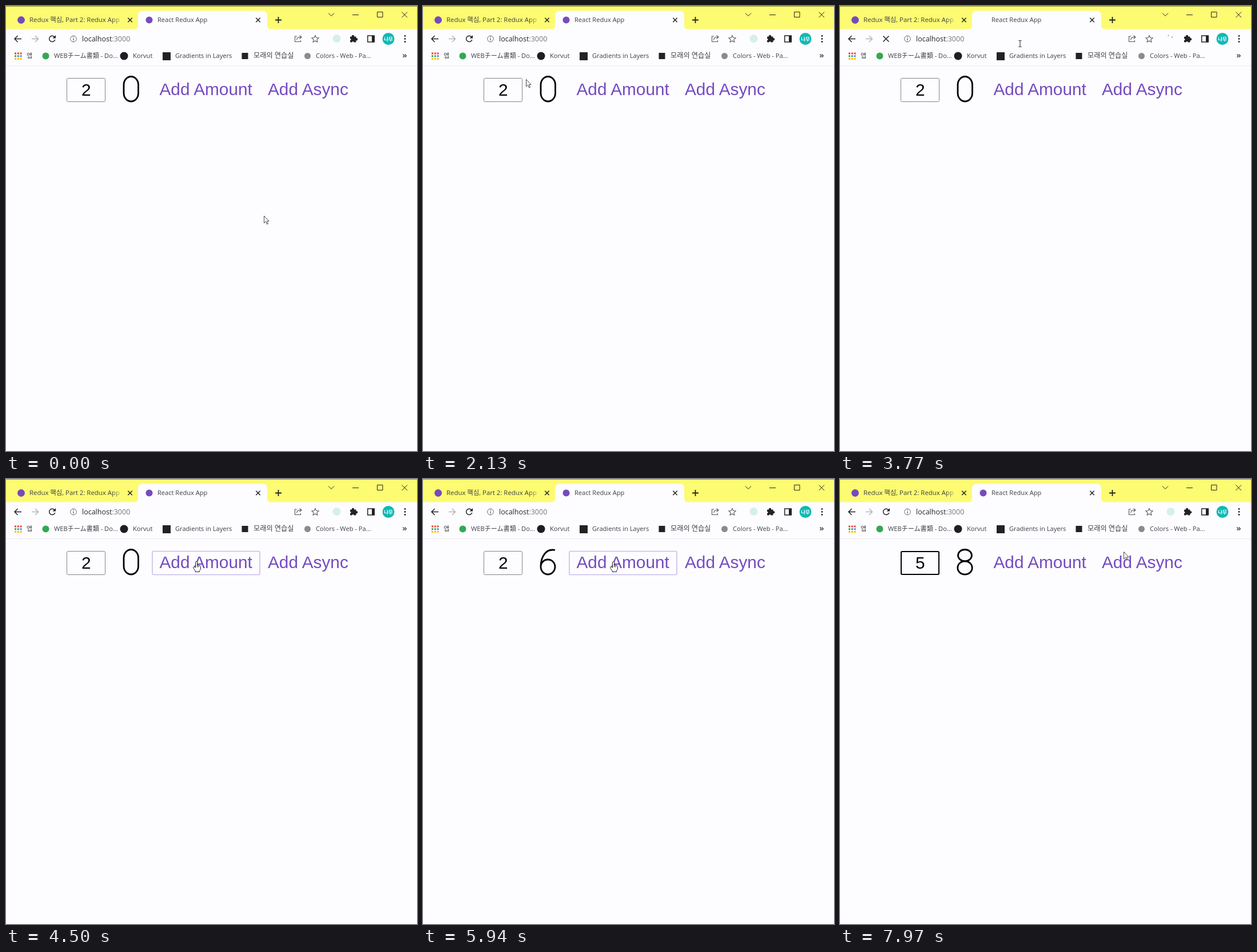
These frames come from a looping animation (719 by 779 pixels, 8 s). An HTML page:

```html
<!DOCTYPE html>
<html lang="ko">
<head>
<meta charset="utf-8">
<title>React Redux App</title>
<style>
html, body { margin: 0; width: 100%; height: 100%; overflow: hidden; background: #fdfcff; }
svg { display: block; width: 100%; height: 100%; }
text { white-space: pre; }
.ui { font: 11.1px "Open Sans", "Noto Sans CJK KR", "Noto Sans CJK JP", "Noto Sans CJK", sans-serif; fill: #3c4043; }
.page { font: 29.8px "Liberation Sans", Arial, sans-serif; }
.line { fill: none; stroke: #222; stroke-width: 1.5; }
.thin { fill: none; stroke: #222; stroke-width: 1; }
.digit { fill: none; stroke: #000; stroke-width: 2.8; }

/* Everything runs on one 8 s clock; 1% = 80 ms */
.step { animation: 8s step-end infinite; }
#cursor { animation: move 8s linear infinite; }
#hover { animation: hover 8s linear infinite; }
#arrow { animation-name: arrow; }
#hand { animation-name: hand; }
#beam { animation-name: beam; }
#n0 { animation-name: n0; }
#n2 { animation-name: n2; }
#n4 { animation-name: n4; }
#n6 { animation-name: n6; }
#n8 { animation-name: n8; }
#focus { animation-name: focus; }
#caret { animation-name: caret; }
#two { animation-name: two; }
#five { animation-name: five; }
.idle { animation-name: idle; }
.busy { animation-name: busy; }

@keyframes move {
  0%, .75% { transform: translate(451px, 367px); }
  5%, 21.62% { transform: translate(511px, 405px); }
  21.625%, 23.375% { transform: translate(395px, 364px); }
  26.625%, 27.125% { transform: translate(180px, 128px); }
  28.75%, 30% { transform: translate(120px, 146px); }
  33.75%, 36.625% { transform: translate(308px, 142px); }
  45.375%, 47.5% { transform: translate(315px, 66px); }
  50%, 52.5% { transform: translate(325px, 141px); }
  56.25%, 77.5% { transform: translate(333px, 144px); }
  81.875%, 93% { transform: translate(152px, 147px); }
  99.625%, 100% { transform: translate(496px, 127px); }
}
@keyframes arrow {
  0%, 31%, 38.5%, 47.75%, 79.4%, 93.4%, 98.6% { opacity: 1; }
  27.25%, 32.75%, 44.5%, 49.4%, 81.3%, 95% { opacity: 0; }
  100% { opacity: 1; }
}
@keyframes hand {
  0%, 38.5%, 79.4%, 98.6%, 100% { opacity: 0; }
  32.75%, 49.4%, 95% { opacity: 1; }
}
@keyframes beam {
  0%, 31%, 47.75%, 88.375%, 93.4%, 100% { opacity: 0; }
  27.25%, 44.5%, 81.3%, 93% { opacity: 1; }
}
@keyframes hover {
  0%, 32.75%, 40%, 49.4%, 81%, 95%, 99.6%, 100% { opacity: 0; }
  33.75%, 38.5%, 51.2%, 79.4%, 96.8%, 98.6% { opacity: 1; }
}
@keyframes n0 { 0% { opacity: 1; } 57.5%, 100% { opacity: 0; } }
@keyframes n2 { 0%, 69.25%, 100% { opacity: 0; } 57.5% { opacity: 1; } }
@keyframes n4 { 0%, 72.5%, 100% { opacity: 0; } 69.25% { opacity: 1; } }
@keyframes n6 { 0%, 75.75%, 100% { opacity: 0; } 72.5% { opacity: 1; } }
@keyframes n8 { 0% { opacity: 0; } 75.75%, 100% { opacity: 1; } }
@keyframes focus { 0% { opacity: 0; } 82.5%, 100% { opacity: 1; } }
@keyframes caret {
  0% { opacity: 0; transform: none; }
  82.5% { opacity: 1; transform: none; }
  88.375% { opacity: 1; transform: translateX(-9px); }
  88.75% { opacity: 1; transform: none; }
  95%, 100% { opacity: 0; transform: none; }
}
@keyframes two { 0% { opacity: 1; } 88.375%, 100% { opacity: 0; } }
@keyframes five { 0% { opacity: 0; } 88.75%, 100% { opacity: 1; } }
@keyframes idle { 0%, 49.875%, 100% { opacity: 1; } 47.125% { opacity: 0; } }
@keyframes busy { 0%, 49.875%, 100% { opacity: 0; } 47.125% { opacity: 1; } }
</style>
</head>
<body>
<svg viewBox="0 0 719 779" preserveAspectRatio="none">
  <defs>
    <linearGradient id="fade"><stop stop-color="#fdfb72" stop-opacity="0"/><stop offset="1" stop-color="#fdfb72"/></linearGradient>
    <path id="x" d="M-3.7-3.7 3.7 3.7M3.7-3.7-3.7 3.7"/>
  </defs>
  <rect width="719" height="779" fill="#fdfcff"/>

  <!-- tab strip -->
  <rect width="719" height="40.500" fill="#fdfb72"/>
  <rect width="719" height="1" fill="#8b893f"/>
  <path d="M224 41q7 0 7-8V16.500q0-8 8-8H449q8 0 8 8V33q0 8 7 8z" fill="#fdfcff"/>
  <circle cx="26.500" cy="24.500" r="6.500" fill="#764abc"/>
  <text class="ui" x="41" y="28" style="font-size:11.4px">Redux 핵심, Part 2: Redux App</text>
  <rect x="186" y="12" width="20" height="24" fill="url(#fade)"/>
  <circle class="step idle" cx="250.500" cy="24.500" r="6" fill="#764abc"/>
  <text class="ui" x="265" y="28">React Redux App</text>
  <g class="line">
    <use href="#x" x="217" y="24.500"/>
    <use href="#x" x="441" y="24.500"/>
    <path d="M471 24.500h11M476.500 19v11" stroke-width="1.800"/>
  </g>
  <g class="thin">
    <path d="M564 12.500l5 5 5-5M606 15.500h11M649.500 10.500h9.500v9h-9.500zM692.500 10.500l9.500 9.500M702 10.500l-9.500 9.500"/>
  </g>

  <!-- toolbar -->
  <path class="line" d="M27 57.500H15.500M20.500 52l-5.500 5.500 5.500 5.500"/>
  <path class="line" style="stroke:#b5b5b8" d="M45 57.500h11M51 52l5.500 5.500-5.500 5.500"/>
  <g class="step idle">
    <path class="line" d="M84.800 54A5.200 5.200 0 1 0 85.800 59"/>
    <path d="M87 51v5.500h-5.500z" fill="#222"/>
  </g>
  <path class="line step busy" d="M75.500 52.500l10 10M85.500 52.500l-10 10"/>
  <circle class="thin" cx="118" cy="57.500" r="5.300" style="stroke:#5f6368"/>
  <path d="M118 56.500v4M118 54v1.300" stroke="#5f6368" stroke-width="1.300"/>
  <text class="ui" x="133" y="62" style="font-size:12.5px;fill:#25272a">localhost<tspan fill="#74777c">:3000</tspan></text>
  <g class="thin" style="stroke:#55585c;stroke-width:1.100">
    <path d="M509 53h-3.500v9.500h10V60M508.500 59.500c.5-4 3-5 5.500-5h2.500M513.500 51.500l3.500 3-3.500 3"/>
    <path d="M541 51.500l1.800 4 4.300.5-3.200 2.900.9 4.300-3.800-2.200-3.800 2.200.9-4.300-3.200-2.900 4.300-.5z"/>
  </g>
  <circle class="step idle" cx="578.500" cy="57" r="7" fill="#d5f1e7"/>
  <g class="step busy" fill="#777"><circle cx="574.500" cy="51.500" r=".9"/><circle cx="581" cy="54.500" r=".9"/></g>
  <g fill="#222">
    <rect x="602" y="53.500" width="10.500" height="10" rx="1"/>
    <circle cx="607" cy="53" r="2.200"/><circle cx="613" cy="58.300" r="2.200"/>
    <circle cx="602" cy="58.500" r="1.500" fill="#fdfcff"/><circle cx="607" cy="63.500" r="1.500" fill="#fdfcff"/>
    <path d="M640 52h4.500v11H640z"/>
    <circle cx="698" cy="52.500" r="1.400"/><circle cx="698" cy="57.500" r="1.400"/><circle cx="698" cy="62.500" r="1.400"/>
  </g>
  <rect class="line" x="632.700" y="52" width="11.600" height="11"/>
  <circle cx="669" cy="57.500" r="10.500" fill="#12b8b5"/>
  <text class="ui" x="669" y="60.800" text-anchor="middle" style="font-size:8.5px;font-weight:600;fill:#fff">나무</text>

  <!-- bookmarks -->
  <g stroke-width="3" stroke-dasharray="3 1.800">
    <path d="M15 83h13" stroke="#ea4335"/>
    <path d="M15 87.700h8" stroke="#34a853"/><path d="M24.600 87.700h3" stroke="#4285f4"/>
    <path d="M15 92.400h13" stroke="#fbbc04"/>
  </g>
  <circle cx="69.500" cy="87.500" r="6" fill="#34a853"/>
  <circle cx="206.500" cy="87.500" r="7" fill="#1b1f23"/>
  <rect x="274" y="81" width="14" height="14" fill="#222"/>
  <rect x="412.500" y="82" width="11" height="11" fill="#222"/>
  <circle cx="527.500" cy="87.500" r="5.500" fill="#8b8b8e"/>
  <g class="ui">
    <text x="36" y="91">앱</text>
    <text x="84" y="91">WEBチーム書類 - Do...</text>
    <text x="222" y="91">Korvut</text>
    <text x="296" y="91">Gradients in Layers</text>
    <text x="433" y="91" style="font-size:12.2px">모래의 연습실</text>
    <text x="542" y="91">Colors - Web - Pa...</text>
  </g>
  <path class="thin" style="stroke-width:1.200" d="M694.500 84.500l2.500 2.700-2.500 2.700M697.700 84.500l2.500 2.700-2.500 2.700"/>
  <rect y="104" width="719" height="1" fill="#ecebf5"/>

  <!-- counter -->
  <rect x="106.500" y="126.500" width="67" height="41" rx="2" fill="#fdfcff" stroke="#858588"/>
  <rect id="focus" class="step" x="107" y="127" width="66" height="40" rx="2" fill="none" stroke="#000" stroke-width="2"/>
  <g class="page" text-anchor="middle">
    <text id="two" class="step" x="140.200" y="157">2</text>
    <text id="five" class="step" x="140.200" y="157">5</text>
  </g>
  <rect id="caret" class="step" x="148.200" y="131" width="1.800" height="32"/>

  <g class="digit">
    <rect id="n0" class="step" x="206" y="123.500" width="25.500" height="43.500" rx="12.700" ry="14.500"/>
    <path id="n2" class="step" d="M204.500 135C205 119.500 230 119.500 230 134.500C230 142 222 148 204 165V166.500H231V163.500"/>
    <path id="n4" class="step" d="M225 166.500V124.500H222L204.500 152.500H231.500M215.500 166.500H231.500"/>
    <path id="n6" class="step" d="M231 124.500C214 121 206 138 206 153.500A12.500 13.500 0 1 0 231 153.500A12.500 12.500 0 0 0 206 153.500"/>
    <g id="n8" class="step"><ellipse cx="218.500" cy="133.700" rx="12" ry="10.200"/><ellipse cx="218.500" cy="155.500" rx="12.700" ry="11.600"/></g>
  </g>

  <rect id="hover" x="256" y="126.500" width="188" height="41" rx="2" fill="none" stroke="#c9bcec" stroke-width="1.600"/>
  <g class="page" fill="#744cc0">
    <text x="268.500" y="156">Add Amount</text>
    <text x="458" y="156">Add Async</text>
  </g>

  <!-- pointer -->
  <g id="cursor">
    <path id="arrow" class="step" d="M.5.500V13L3.500 10.300 5.700 15 7.500 14.200 5.400 9.700H9.200z" fill="#fff" stroke="#333" stroke-width=".9"/>
    <path id="hand" class="step" d="M-1.500 11V1.500Q0-.8 1.500 1.500V7Q2.800 5.700 4 7.200Q5.300 6.400 6.300 8.200Q7.500 7.800 7.500 9.700V13Q7 15.500 5.500 16.500V18.500H-2V16.500L-5.500 11.500Q-5.500 9-3.500 9.700zM1.500 7V10.500M4 7.200V10.500" fill="#fff" stroke="#222" stroke-width="1"/>
    <path id="beam" class="step" d="M-2.500-5.500H-.8L0-5 .8-5.500H2.500M0-5V5M-2.500 5.500H-.8L0 5 .8 5.500H2.500" fill="none" stroke="#222" stroke-width="1"/>
  </g>
</svg>
</body>
</html>
```
